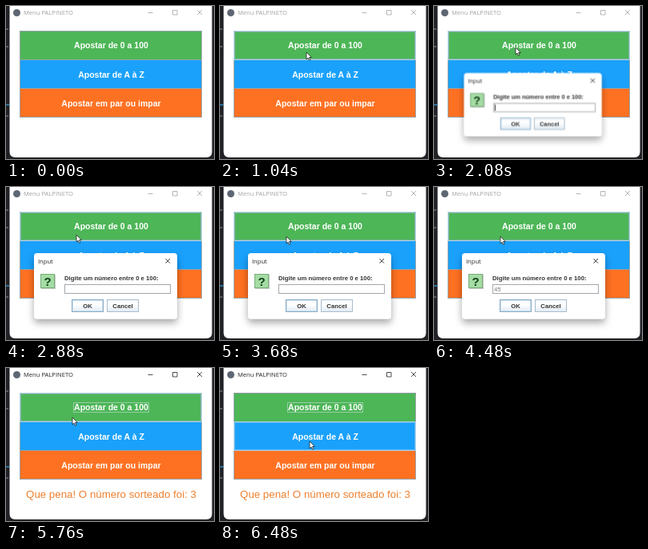
Write an HTML page that moves like this. It is 260 px wide and 192 px high and loops after 8 s.

```html
<!DOCTYPE html>
<html lang="pt-BR">
<head>
<meta charset="utf-8">
<title>Menu</title>
<style>
  html, body { margin: 0; width: 100%; height: 100%; overflow: hidden; background: #202226; }
  svg { display: block; width: 260px; height: 192px; }
  text { font-family: "Liberation Sans", Arial, sans-serif; }
  .caption { font: 7.6px "Open Sans", sans-serif; }
  .choice { font-size: 10.5px; font-weight: 700; fill: #fff; text-anchor: middle; }
  .label { font-size: 7.75px; font-weight: 700; fill: #333; }
  .typed { font-size: 7.75px; fill: #777; }
  .mid { text-anchor: middle; }
  .line { fill: none; stroke-width: 1; }

  /* One percent of the 8 s loop is 80 ms. */
  .anim { animation: 8s step-end infinite; }
  .title { animation-name: activate; }
  .press { animation-name: press; }
  .hover1 { animation-name: hover1; }
  .hover2 { animation-name: hover2; }
  .focus { animation-name: focus; }
  .result { animation-name: result; }
  .dialog { animation-name: dialog; transform-origin: 100px 115px; }
  .caret { animation-name: caret; }
  .digit1 { animation-name: digit1; }
  .digit2 { animation-name: digit2; }
  .cursor { animation-name: move; }

  @keyframes activate { 0% { color: #a2a2a2; } 64%, 100% { color: #222; } }
  @keyframes press { 0%, 25%, 100% { opacity: 0; } 24% { opacity: 1; } }
  @keyframes hover1 { 0%, 76%, 100% { opacity: 0; } 13% { opacity: 1; } }
  @keyframes hover2 { 0% { opacity: 0; } 76%, 100% { opacity: 1; } }
  @keyframes focus { 0% { opacity: 0; } 65%, 100% { opacity: 1; } }
  @keyframes result { 0% { opacity: 0; } 68%, 100% { opacity: 1; } }
  @keyframes caret { 0%, 32%, 100% { opacity: 0; } 25% { opacity: 1; } }
  @keyframes digit1 { 0% { opacity: 0; } 50%, 100% { opacity: 1; } }
  @keyframes digit2 { 0% { opacity: 0; } 53%, 100% { opacity: 1; } }
  @keyframes dialog {
    0%, 65%, 100% { opacity: 0; transform: scale(.9); }
    25% { opacity: .5; transform: scale(.9); }
    26% { opacity: 1; transform: scale(.962); }
    27% { opacity: 1; transform: scale(.99); }
    28% { opacity: 1; transform: none; }
    64% { opacity: .5; transform: scale(.95); }
  }
  @keyframes move {
    0% { opacity: 0; transform: translate(108px, 58px); }
    13% { opacity: 1; transform: translate(108px, 58px); }
    14% { opacity: 1; transform: translate(102px, 52px); }
    26% { opacity: 1; transform: translate(102px, 52px); animation-timing-function: steps(10); }
    36% { opacity: 1; transform: translate(88px, 60px); animation-timing-function: steps(5); }
    41% { opacity: 1; transform: translate(83px, 62px); }
    74% { opacity: 1; transform: translate(83px, 62px); animation-timing-function: steps(7); }
    81%, 100% { opacity: 1; transform: translate(112px, 92px); }
  }
</style>
</head>
<body>
<svg viewBox="0 0 260 192">
  <defs>
    <linearGradient id="metal" x2="0" y2="1">
      <stop offset="0" stop-color="#f4f8fb"/>
      <stop offset=".4" stop-color="#fff"/>
      <stop offset="1" stop-color="#e0ebf4"/>
    </linearGradient>
    <filter id="shadow" x="-15%" y="-20%" width="130%" height="160%">
      <feDropShadow dx="0" dy="5" stdDeviation="5" flood-opacity=".34"/>
    </filter>
  </defs>

  <!-- Editor behind the window -->
  <rect width="260" height="192" fill="#202226"/>
  <path d="M0 29h3M0 51h3M0 138h3" stroke="#565a5f" stroke-width="2"/>
  <path d="M0 124h4" stroke="#286f9e" stroke-width="2"/>

  <!-- Main window -->
  <path d="M4.500 0H257.500V183q0 7-7 7H11.500q-7 0-7-7Z" fill="#fff"/>
  <circle cx="13.500" cy="8.500" r="4.500" fill="#5d6672"/>
  <g class="anim title">
    <text class="caption" x="22" y="11" fill="currentColor">Menu PALPINETO</text>
    <path class="line" stroke="currentColor" stroke-width=".8" opacity=".8" d="M177.500 8.500h6M208.500 5.500h5.500v5.500h-5.500zM239 5l6 6m0-6l-6 6"/>
  </g>

  <rect x="17" y="31" width="228" height="37" fill="#4db657"/>
  <rect x="17" y="68" width="228" height="36" fill="#1aa1fc"/>
  <rect x="17" y="104" width="228" height="36" fill="#ff7122"/>
  <rect class="anim press" x="17" y="31" width="228" height="37" fill="#cde9fd"/>
  <g class="line">
    <path stroke="#98a3ab" d="M17.500 31.500h227v108h-227zM17.500 67.500h227M17.500 103.500h227"/>
    <g class="anim hover1">
      <path stroke="#b4d3df" d="M17.500 31.500h227v36h-227z"/>
      <path stroke="#7fb3a8" d="M18.500 32.500h225v34h-225z"/>
    </g>
    <g class="anim hover2">
      <path stroke="#a9d2ee" d="M17.500 67.500h227v36h-227z"/>
      <path stroke="#62b5ee" d="M18.500 68.500h225v34h-225z"/>
    </g>
  </g>
  <text class="choice" x="131.500" y="53">Apostar de 0 a 100</text>
  <text class="choice" x="131.500" y="89.500">Apostar de A à Z</text>
  <text class="choice" x="131.500" y="125.500">Apostar em par ou impar</text>
  <rect class="anim focus line" x="84.500" y="43.500" width="94" height="12" stroke="#96cfa8"/>
  <text class="anim result mid" x="131.500" y="163" font-size="13.300" fill="#ee7f2e">Que pena! O número sorteado foi: 3</text>

  <!-- Input dialog -->
  <g class="anim dialog">
    <rect x="35" y="83" width="179" height="82.500" rx="4" fill="#fff" filter="url(#shadow)"/>
    <text class="caption" x="40" y="96" fill="#222">Input</text>
    <path class="line" stroke="#333" d="M199.500 90l5.500 5.500m0-5.500l-5.500 5.500"/>

    <rect x="44" y="110" width="18" height="18" fill="#c3ccc3"/>
    <rect x="43.500" y="109.500" width="17" height="17" fill="#a4dca4" stroke="#79ac7b"/>
    <text class="mid" x="52" y="123.500" font-size="15" font-weight="700" fill="#123d18">?</text>

    <text class="label" x="73" y="117">Digite um número entre 0 e 100:</text>
    <rect x="73.500" y="122.500" width="132" height="11" fill="#fff" stroke="#a3a8ad"/>
    <path class="anim caret line" stroke="#222" d="M75.500 124v8"/>
    <text class="typed anim digit1" x="75" y="131">4</text>
    <text class="typed anim digit2" x="79.300" y="131">5</text>

    <rect x="82.500" y="141.500" width="39" height="15" fill="url(#metal)" stroke="#86aac6"/>
    <rect class="line" x="83.500" y="142.500" width="37" height="13" stroke="#cfe2ef"/>
    <text class="label mid" x="102" y="152">OK</text>
    <rect x="126.500" y="141.500" width="39" height="15" fill="url(#metal)" stroke="#a9bccb"/>
    <text class="label mid" x="146" y="152">Cancel</text>
  </g>

  <path class="anim cursor" d="M0 0V9l2-1.900 1.500 3.200 1.500-.7-1.500-3.100h2.800Z" fill="#fff" stroke="#222" stroke-width=".8"/>
</svg>
</body>
</html>
```
